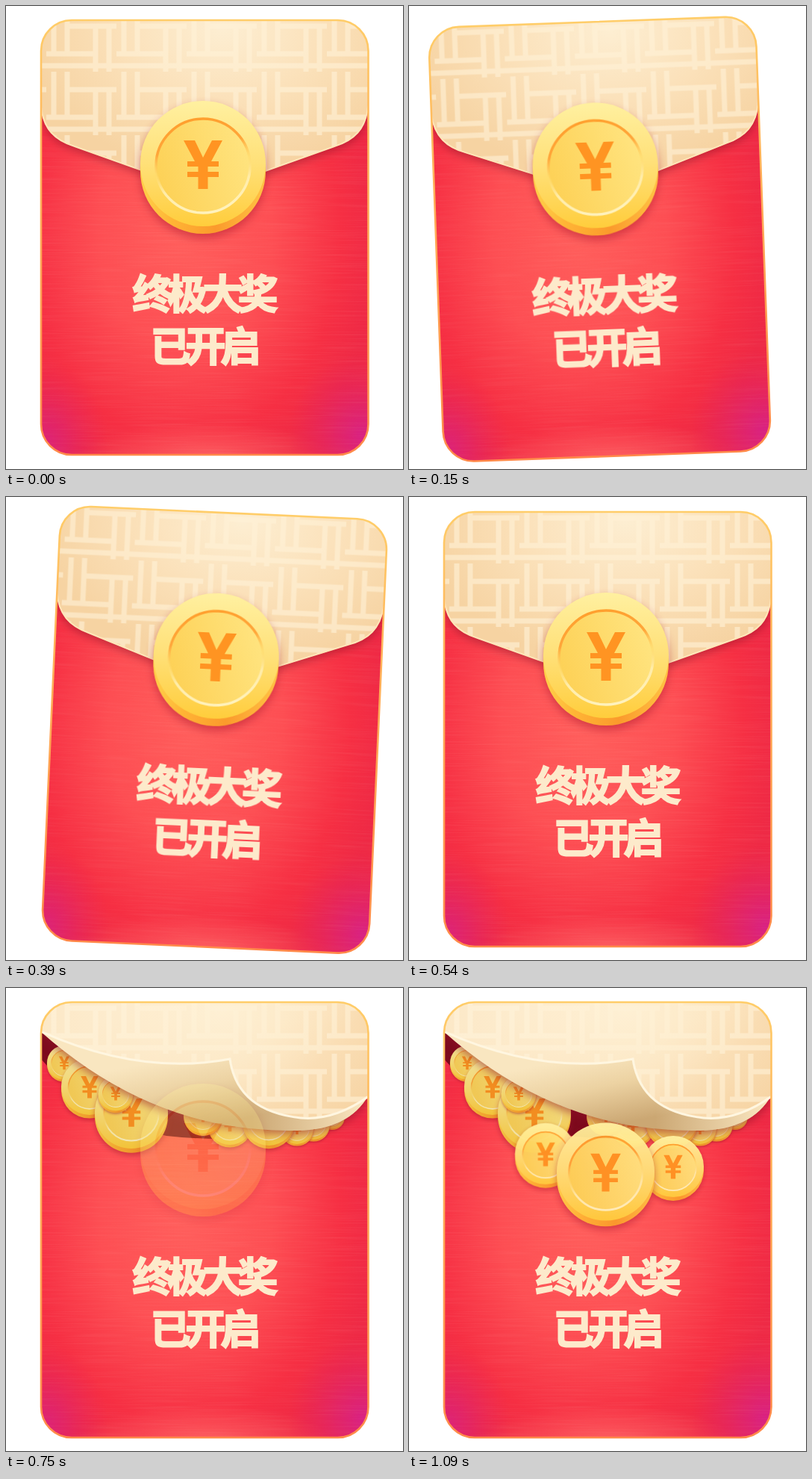
These frames come from a looping animation (532 px wide and 620 px high, 1.29 s). An HTML page:

```html
<!DOCTYPE html>
<html lang="zh">
<head>
<meta charset="utf-8">
<style>
  html, body { margin: 0; width: 100%; height: 100%; overflow: hidden; background: #fff; }
  svg { display: block; }
  #title text {
    font: 900 54px "Noto Sans CJK SC", "Noto Sans CJK", sans-serif;
    letter-spacing: -7px; text-anchor: middle;
    fill: #fdeacb; stroke: #fdeacb; stroke-width: 2.2;
  }
  .back { filter: brightness(.95); }
  .coin { filter: drop-shadow(0 6px 6px #a8142a77); }
  .flap { filter: drop-shadow(0 5px 6px #90102888); }
</style>
</head>
<body>
<svg width="532" height="620" viewBox="0 0 532 620">
  <defs>
    <clipPath id="cardClip"><rect id="clipRect" x="47" y="19" width="438" height="582" rx="41"/></clipPath>
    <radialGradient id="red" gradientUnits="userSpaceOnUse" cx="0" cy="0" r="1"
      gradientTransform="translate(240 305) scale(260 350)">
      <stop offset="0" stop-color="#ff5f5c"/><stop offset=".45" stop-color="#fd4e53"/>
      <stop offset=".8" stop-color="#f62f43"/><stop offset="1" stop-color="#ee2945"/>
    </radialGradient>
    <radialGradient id="magenta">
      <stop offset="0" stop-color="#d6208a"/><stop offset=".35" stop-color="#dc2276" stop-opacity=".75"/>
      <stop offset="1" stop-color="#e82458" stop-opacity="0"/>
    </radialGradient>
    <radialGradient id="glow">
      <stop offset="0" stop-color="#ff6a68" stop-opacity=".8"/><stop offset="1" stop-color="#ff6a68" stop-opacity="0"/>
    </radialGradient>
    <linearGradient id="edge" x2="0" y2="1">
      <stop offset="0" stop-color="#ffcd69"/><stop offset=".3" stop-color="#ffb45a"/><stop offset="1" stop-color="#ff8a4a"/>
    </linearGradient>
    <radialGradient id="cream" gradientUnits="userSpaceOnUse" cx="0" cy="0" r="1"
      gradientTransform="translate(290 30) scale(270 190)">
      <stop offset="0" stop-color="#fdeed2"/><stop offset=".5" stop-color="#fbe1ba"/><stop offset="1" stop-color="#f6d3a2"/>
    </radialGradient>
    <linearGradient id="sheen" gradientUnits="userSpaceOnUse" x1="150" y1="18" x2="330" y2="190">
      <stop offset="0" stop-color="#fff4dc" stop-opacity=".6"/><stop offset=".7" stop-color="#fff0d2" stop-opacity=".4"/>
      <stop offset="1" stop-color="#fff0d2" stop-opacity="0"/>
    </linearGradient>
    <linearGradient id="underside" gradientUnits="userSpaceOnUse" x1="215" y1="95" x2="235" y2="192">
      <stop offset="0" stop-color="#f9e6c0"/><stop offset=".45" stop-color="#ecd2a2"/><stop offset="1" stop-color="#cba773"/>
    </linearGradient>
    <linearGradient id="curl" gradientUnits="userSpaceOnUse" x1="330" y1="0" x2="484" y2="0">
      <stop offset="0" stop-color="#fbe8c3" stop-opacity="0"/><stop offset="1" stop-color="#fbe8c3"/>
    </linearGradient>
    <linearGradient id="face" x2="0" y2="1">
      <stop offset="0" stop-color="#fff0a0"/><stop offset=".5" stop-color="#ffe078"/><stop offset="1" stop-color="#ffcd3c"/>
    </linearGradient>
    <linearGradient id="inner" x1="0" y1=".65" x2="1" y2=".3">
      <stop offset="0" stop-color="#fdd156"/><stop offset="1" stop-color="#ffe480"/>
    </linearGradient>
    <linearGradient id="groove" x1=".4" y1="0" x2=".6" y2="1">
      <stop offset="0" stop-color="#ff9f2e"/><stop offset=".3" stop-color="#ffa63a"/>
      <stop offset=".5" stop-color="#ffd968" stop-opacity=".4"/><stop offset=".7" stop-color="#ffeca8"/>
      <stop offset="1" stop-color="#fff2bd"/>
    </linearGradient>
    <linearGradient id="rim">
      <stop offset="0" stop-color="#ffd04a"/><stop offset=".25" stop-color="#ffb435"/>
      <stop offset=".6" stop-color="#fb9a2c"/><stop offset="1" stop-color="#ffc244"/>
    </linearGradient>
    <pattern id="lattice" patternUnits="userSpaceOnUse" x="54" y="3" width="94" height="85">
      <path d="M28 24H94M0 61H66M28 0V61M66 24V85M0 77H94M84 24V85M10 0V61"
        fill="none" stroke="#fff1d7" stroke-width="7" stroke-opacity=".6"/>
    </pattern>
    <filter id="brushed" x="0" y="0" width="1" height="1">
      <feTurbulence type="fractalNoise" baseFrequency=".012 .6" numOctaves="2" seed="4"/>
      <feColorMatrix values="0 0 0 0 1  0 0 0 0 .55  0 0 0 0 .5  .9 0 0 0 -.38"/>
    </filter>
  </defs>

  <g id="card">
    <g clip-path="url(#cardClip)">
      <rect x="46" y="18" width="440" height="586" fill="url(#red)"/>
      <ellipse cx="265" cy="606" rx="170" ry="50" fill="url(#glow)"/>
      <ellipse cx="52" cy="585" rx="85" ry="110" fill="url(#magenta)" opacity=".75"/>
      <ellipse cx="478" cy="575" rx="100" ry="110" fill="url(#magenta)" opacity=".9"/>
      <rect x="46" y="18" width="440" height="586" filter="url(#brushed)" opacity=".2"/>

      <g id="opened">
        <path d="M46 50V94Q120 178 215 198Q290 206 360 198Q440 185 486 140V50Z" fill="#7d0a1d"/>
        <g id="backCoins" class="back"></g>
        <g class="flap">
          <path class="under" fill="url(#underside)"/>
          <path class="under" fill="url(#curl)"/>
          <path class="front" fill="url(#cream)"/>
          <path class="front" fill="url(#lattice)"/>
          <path class="front" fill="url(#sheen)"/>
        </g>
        <path d="M46 58Q180 118 300 95Q310 165 395 174Q440 178 486 145" fill="none" stroke="#fff6e0" stroke-width="3"/>
      </g>

      <g id="closed">
        <g class="flap">
          <path class="shut" fill="url(#cream)"/>
          <path class="shut" fill="url(#lattice)"/>
        </g>
        <path class="shut" fill="none" stroke="#ffe6b8" stroke-width="2"/>
      </g>
    </g>
    <rect id="border" x="47" y="19" width="438.5" height="582" rx="41" fill="none" stroke="url(#edge)" stroke-width="2.6"/>
    <g id="bigCoin"></g>
    <g id="trio"></g>
  </g>
  <g id="title">
    <text x="263.5" y="405.5">终极大奖</text>
    <text x="264" y="475.5">已开启</text>
  </g>
</svg>
<script>
const $ = id => document.getElementById(id);
const setPath = (selector, d) =>
  document.querySelectorAll(selector).forEach(p => p.setAttribute('d', d));

const YEN = 'M-26 -31H-11L0 -8L12 -31H26L11 -3H21V4H6.5V11H21V18H6.5V34H-6.5V18H-21V11H-6.5V4H-21V-3H-11Z';

// x, y: centre of the face; r: its radius
const coin = ([x, y, r]) => `
  <g class="coin" transform="translate(${x} ${y}) scale(${r / 84})">
    <path d="M-84 0V10A84 84 0 0 0 84 10V0Z" fill="url(#rim)"/>
    <circle r="84" fill="url(#face)"/>
    <circle cy="3" r="63" fill="url(#inner)" stroke="url(#groove)" stroke-width="3.5"/>
    <path d="${YEN}" fill="#ff9422"/>
  </g>`;
const addCoins = (id, list) => { $(id).innerHTML = list.map(coin).join(''); };

addCoins('bigCoin', [[264, 211, 84]]);
addCoins('backCoins', [
  [78, 100, 23], [112, 132, 38], [168, 166, 49], [147, 141, 23.5],
  [437, 171, 17], [412, 181, 22], [390, 187, 22], [300, 180, 30], [264, 169, 26], [352, 176, 35]
]);
addCoins('trio', [[183, 221, 41], [354, 238, 41], [263.5, 245, 65.5]]);

setPath('.shut', 'M40 10H492V135H485C482 165 466 180 440 188L266 250L92 188C66 180 50 165 47 135H40Z');
setPath('.front', 'M46 18H486V145Q440 178 395 174Q310 165 300 95Q180 118 46 58Z');
setPath('.under', 'M46 58Q180 118 300 95Q310 165 395 174Q440 178 486 143Q460 190 390 191Q200 195 46 58Z');

const LOOP = 1290, LAST = 1090, STEP = 30;

// Linear interpolation through [time, value] keys
function track(keys, t) {
  const i = keys.findIndex(k => k[0] > t);
  if (i < 0) return keys[keys.length - 1][1];
  if (i === 0) return keys[0][1];
  const [t0, a] = keys[i - 1], [t1, b] = keys[i];
  return a + (b - a) * (t - t0) / (t1 - t0);
}

const ANGLE = [[0, 0], [120, -2.8], [240, 0], [390, 2.6], [540, 0]];
const DROP = [[0, 0], [120, 2], [150, 2], [240, 0], [390, 1.5], [540, 1]];
const FLAP_OUT = [[540, 1], [660, 0]];
const COIN_OUT = [[540, 1], [830, 0]];
const TRIO_IN = [[860, 0], [1090, 1]];

function render(ms) {
  const t = Math.min(Math.floor(ms / STEP) * STEP, LAST);
  const opening = t > 540;
  const sway = (id, pivotY) => $(id).setAttribute('transform',
    `translate(0 ${track(DROP, t)}) rotate(${track(ANGLE, t)} 266 ${pivotY})`);
  sway('card', 602);
  sway('title', 510);
  // Once open, the top edge settles back while the bottom stays down
  for (const id of ['clipRect', 'border']) {
    $(id).setAttribute('y', opening ? 18 : 19);
    $(id).setAttribute('height', opening ? 583 : 582);
  }
  $('opened').setAttribute('display', opening ? 'inline' : 'none');
  $('opened').setAttribute('transform', 'translate(0 -1)');
  $('closed').setAttribute('opacity', track(FLAP_OUT, t));
  $('bigCoin').setAttribute('opacity', track(COIN_OUT, t));
  $('trio').setAttribute('opacity', track(TRIO_IN, t));
}

const start = performance.now();
function loop() {
  render((performance.now() - start) % LOOP);
  requestAnimationFrame(loop);
}
loop();
</script>
</body>
</html>
```
